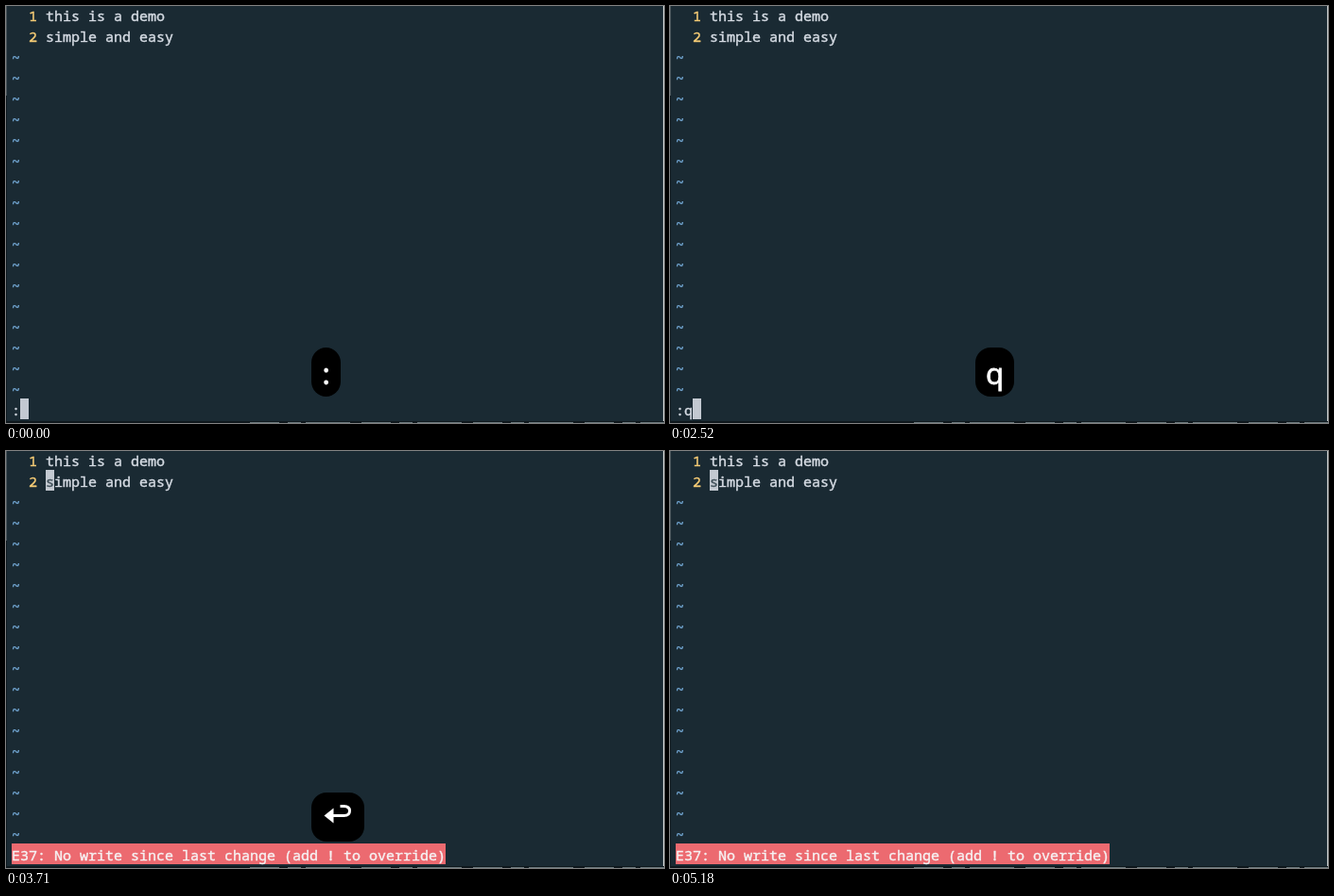
Animation of 696x442 px, one loop 5250 ms. Source, as an HTML page:

```html
<!DOCTYPE html>
<html lang="en">
<head>
<meta charset="utf-8">
<title>Editor demo</title>
<style>
  html, body { margin: 0; width: 100%; height: 100%; overflow: hidden; background: #1a2a33; }
  svg { display: block; width: 696px; height: 442px; }
  text { white-space: pre; fill: currentColor; stroke: currentColor; }
  .term { font: 500 15px "Noto Sans Mono", "DejaVu Sans Mono", monospace; color: #d6dce4; stroke-width: .4; }
  .key { font: 31px "Open Sans", "Noto Sans", sans-serif; color: #fff; stroke-width: .9; }
</style>
</head>
<body>
<svg id="stage" viewBox="0 0 696 442" xmlns="http://www.w3.org/2000/svg"></svg>
<script>
const NS = 'http://www.w3.org/2000/svg';
const LOOP = 5250, LINGER = 2000, FADE = 200;
const COL = 9, ROW = 22, LEFT = 6;
const BG = '#1a2a33', CURSOR = '#c3c9d1', RED = '#ec6a70';
const TYPE_Q = 905, PRESS_RETURN = 2555;
const stage = document.getElementById('stage');

function add(parent, tag, attrs, content = '') {
  const el = document.createElementNS(NS, tag);
  for (const name in attrs) el.setAttribute(name, attrs[name]);
  el.textContent = content;
  return parent.appendChild(el);
}

function rect(parent, x, y, width, height, fill, rx = 0) {
  return add(parent, 'rect', { x, y, width, height, fill, rx });
}

function write(parent, col, row, content, color) {
  const attrs = { class: 'term', x: LEFT + col * COL, y: 16 + row * ROW };
  if (color) attrs.style = `color:${color}`;
  return add(parent, 'text', attrs, content);
}

function block(parent, col, row, cols, fill) {
  return rect(parent, LEFT + col * COL, row * ROW - 2, cols * COL, ROW, fill);
}

function show(el, visible) {
  el.setAttribute('visibility', visible ? 'visible' : 'hidden');
}

// Window and its thin edges
rect(stage, 0, 0, 696, 442, BG);
rect(stage, 0, 0, 1, 95, '#4a565c');
rect(stage, 0, 95, 1, 347, '#0f191f');
rect(stage, 695, 0, 1, 440, '#c2c8c9');
rect(stage, 0, 440, 696, 2, '#0e171c');
add(stage, 'path', {
  d: 'M258 441.5H696', stroke: '#68767a', 'stroke-dasharray': '31 9 14 5 47 12'
});

// Buffer
['this is a demo', 'simple and easy'].forEach((line, i) => {
  write(stage, 2, i, String(i + 1), '#f8cd76');
  write(stage, 4, i, line);
});
for (let row = 2; row < 19; row++) write(stage, 0, row, '~', '#74a9d6');

// Command line
const command = add(stage, 'g', {});
const commandText = write(command, 0, 19, ':');
const commandCursor = block(command, 1, 19, 1, CURSOR);

// Error message, with the cursor back in the buffer
const failure = add(stage, 'g', {});
block(failure, 4, 1, 1, CURSOR);
write(failure, 4, 1, 's', '#40505a');
block(failure, 0, 19, 51, RED);
write(failure, 0, 19, 'E37: No write since last change (add ! to override)', '#f6f2f3');

// Key bubbles; each moves up when the next key is pressed
function bubble(width, label, pressed, pushed) {
  const el = add(stage, 'g', {});
  rect(el, 323, 362, width, 52, '#000', 16);
  if (label) {
    add(el, 'text', { class: 'key', x: 323 + width / 2, y: 400.5, 'text-anchor': 'middle' }, label);
  } else {
    add(el, 'path', { d: 'M345 386.5H357.5q6 0 6-5t-6-5h-4', fill: 'none', stroke: '#fff', 'stroke-width': 3 });
    add(el, 'path', { d: 'M336.5 386.5L346.5 378.5V394.5Z', fill: '#fff' });
  }
  return { el, pressed, pushed };
}

const bubbles = [
  bubble(31, ':', -750, TYPE_Q),
  bubble(41, 'q', TYPE_Q, PRESS_RETURN),
  bubble(56, '', PRESS_RETURN, Infinity)
];

function draw(t) {
  const typed = t >= TYPE_Q, failed = t >= PRESS_RETURN;
  commandText.textContent = typed ? ':q' : ':';
  commandCursor.setAttribute('x', LEFT + COL * (typed ? 2 : 1));
  show(command, !failed);
  show(failure, failed);
  for (const { el, pressed, pushed } of bubbles) {
    const alpha = 1 - (t - pressed - LINGER) / FADE;
    show(el, t >= pressed && alpha > 0);
    el.setAttribute('opacity', Math.max(0, Math.min(1, alpha)));
    el.setAttribute('transform', `translate(0 ${t >= pushed ? -62 : 0})`);
  }
}

const start = performance.now();
function tick() {
  draw((performance.now() - start) % LOOP);
  requestAnimationFrame(tick);
}
tick();
</script>
</body>
</html>
```
